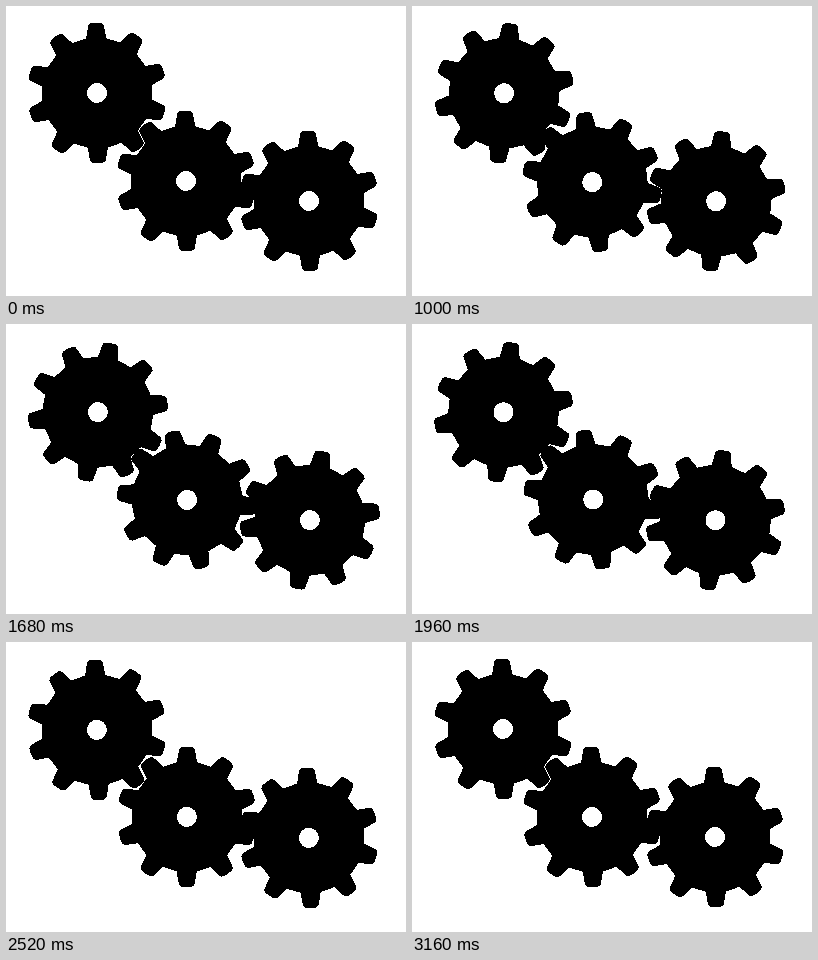
An HTML page for the animation above (3200 ms loop, 400x290 px).

```html
<!DOCTYPE html>
<html lang="en">
<head>
<meta charset="utf-8">
<title>Gears</title>
<style>
  html, body { margin: 0; width: 100%; height: 100%; overflow: hidden; background: #fff; }
  svg { display: block; width: 400px; height: 290px; }
</style>
</head>
<body>
<svg viewBox="0 0 400 290" shape-rendering="crispEdges"></svg>
<script>
const TEETH = 10, FRAMES = 80, FRAME_MS = 40;
const GEARS = [
  { x: 91.5, y: 87.5, dir: 1 },
  { x: 180.5, y: 175.5, dir: -1 },
  { x: 303.5, y: 195.5, dir: 1 }
];

// One upright tooth, from its left base to its right base.
const TOOTH = [
  [-10.1, -54.6], [-8.2, -65.5], [-7.5, -68.2], [-5.2, -69.8],
  [0, -70.2],
  [5.2, -69.8], [7.5, -68.2], [8.2, -65.5], [10.1, -54.6]
];

function gearPath() {
  const points = [];
  for (let i = 0; i < TEETH; i++) {
    const a = i * 2 * Math.PI / TEETH, c = Math.cos(a), s = Math.sin(a);
    for (const [x, y] of TOOTH) {
      points.push((x * c - y * s).toFixed(2) + ' ' + (x * s + y * c).toFixed(2));
    }
  }
  const hole = 'M-10 0a10 10 0 1 0 20 0a10 10 0 1 0 -20 0Z';
  return 'M' + points.join('L') + 'Z' + hole;
}

const svg = document.querySelector('svg');
const shape = gearPath();
for (const gear of GEARS) {
  gear.el = document.createElementNS('http://www.w3.org/2000/svg', 'path');
  gear.el.setAttribute('d', shape);
  gear.el.setAttribute('fill-rule', 'evenodd');
  svg.append(gear.el);
}

// The first and last steps share one pose, a full turn apart.
function draw(step) {
  const angle = 360 * step / (FRAMES - 1);
  for (const { x, y, dir, el } of GEARS) {
    // The gears turn slightly off centre.
    el.setAttribute('transform',
      `translate(${x} ${y}) rotate(${dir * angle}) translate(-.5 -.5) rotate(-.8)`);
  }
}

const start = performance.now();
function tick() {
  const time = Math.max(0, performance.now() - start);
  draw(Math.floor(time / FRAME_MS) % FRAMES);
  requestAnimationFrame(tick);
}
tick();
</script>
</body>
</html>
```
